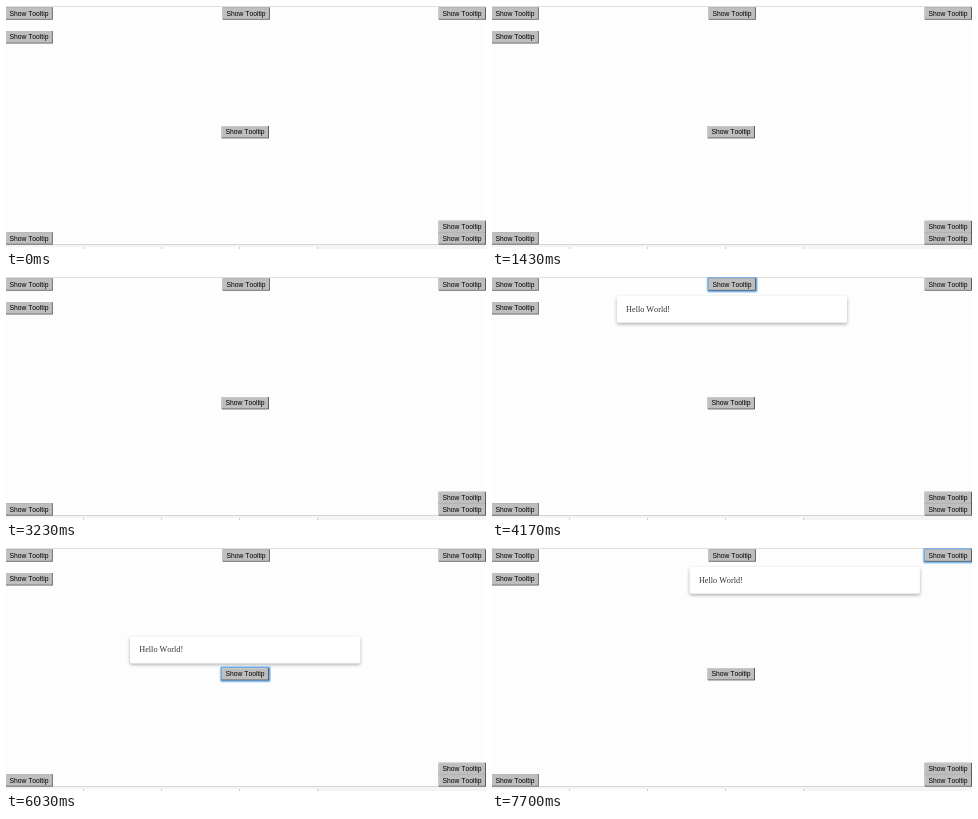
Write an HTML page with a canvas that moves like this. It is 480x243 px and loops after 8000 ms.

```html
<!DOCTYPE html>
<html lang="en">
<head>
<meta charset="utf-8">
<title>Tooltip demo</title>
<style>
html, body { margin: 0; width: 100%; height: 100%; overflow: hidden; background: #fdfdfe; }
canvas { display: block; width: 480px; height: 243px; }
</style>
</head>
<body>
<canvas id="stage"></canvas>
<script>
const W = 480, H = 243, LOOP = 8000;
const canvas = document.getElementById('stage');
const ctx = canvas.getContext('2d');
const ratio = window.devicePixelRatio || 1;
canvas.width = W * ratio;
canvas.height = H * ratio;

const buttons = {
  topLeft: [-0.5, 1.3],
  left: [-0.5, 25.1],
  top: [216.6, 1.3],
  topRight: [432.7, 1.3],
  center: [215.7, 120],
  bottomLeft: [-0.5, 226.2],
  lowerRight: [432.7, 214.8],
  bottomRight: [432.7, 226.2]
};
const BUTTON_W = 47.3, BUTTON_H = 12.4;

// Focus arrives on press; the tooltip closes shortly after focus is lost.
const visits = [
  { button: 'topLeft', press: 500, blur: 1300, close: 1430, tip: [51, 19] },
  { button: 'left', press: 2300, blur: 3100, close: 3230, tip: [51, 18] },
  { button: 'top', press: 4030, blur: 4770, close: 4900, tip: [124.8, 19] },
  { button: 'center', press: 5630, blur: 6630, close: 6770, tip: [124, 88.6] },
  { button: 'topRight', press: 7430, blur: LOOP, close: LOOP, tip: [197.6, 19] }
];

function rect(x, y, w, h, color) {
  ctx.fillStyle = color;
  ctx.fillRect(x, y, w, h);
}

function rounded(x, y, w, h, r, color) {
  ctx.beginPath();
  ctx.roundRect(x, y, w, h, r);
  ctx.fillStyle = color;
  ctx.fill();
}

function text(str, x, y, font, color) {
  ctx.font = font;
  ctx.fontKerning = 'none';
  ctx.fillStyle = color;
  ctx.fillText(str, x, y);
}

function drawPage() {
  rect(0, 0, W, H, '#fdfdfe');
  rect(0, 0, W, 1, '#dedede');
  rect(0, 238, W, 1, '#d6d6d6');
  rect(0, 239, W, 4, '#f4f4f4');
  for (let i = 0; i < 4; i++) {
    rect(78 * i, 241, 77, 2, '#fdfdfd');
    rect(78 * i + 77, 241, 1, 2, '#cccccc');
  }
}

function drawRing([x, y]) {
  const ring = (spread, color) =>
    rounded(x - spread, y - spread, BUTTON_W + 2 * spread, BUTTON_H + 2 * spread, 2, color);
  ring(2, 'rgba(110,175,240,0.5)');
  ring(1.1, '#6fafee');
}

function drawButton([x, y]) {
  rect(x, y, BUTTON_W, BUTTON_H, '#5c5c5c');
  rect(x, y, BUTTON_W - 1.1, BUTTON_H - 1.1, '#c8c8c8');
  rect(x + 0.9, y + 0.9, BUTTON_W - 2, BUTTON_H - 2, '#bebebe');
  text('Show Tooltip', x + 3.9, y + 8.3, '6.75px "Liberation Sans", Arial, sans-serif', '#000');
}

function drawTooltip([x, y], alpha) {
  ctx.save();
  ctx.globalAlpha = alpha;
  ctx.shadowColor = 'rgba(0,0,0,0.32)';
  ctx.shadowBlur = 3.5 * ratio;
  ctx.shadowOffsetY = 1.4 * ratio;
  rounded(x, y, 230.3, 26.8, 1.8, '#fff');
  ctx.shadowColor = 'transparent';
  text('Hello World!', x + 9.3, y + 15.8, '8.2px "Liberation Serif", Times, serif', '#333');
  ctx.restore();
}

function fadeIn(elapsed) {
  const p = Math.min(1, Math.max(0, (elapsed - 50) / 90));
  return 1 - (1 - p) ** 2;
}

function draw(t) {
  ctx.setTransform(ratio, 0, 0, ratio, 0, 0);
  drawPage();
  const visit = visits.find(v => t >= v.press && t < v.close);
  if (visit && t < visit.blur) drawRing(buttons[visit.button]);
  Object.values(buttons).forEach(drawButton);
  if (visit) drawTooltip(visit.tip, fadeIn(t - visit.press));
}

const start = performance.now();
function tick() {
  draw((performance.now() - start) % LOOP);
  requestAnimationFrame(tick);
}
tick();
</script>
</body>
</html>
```
